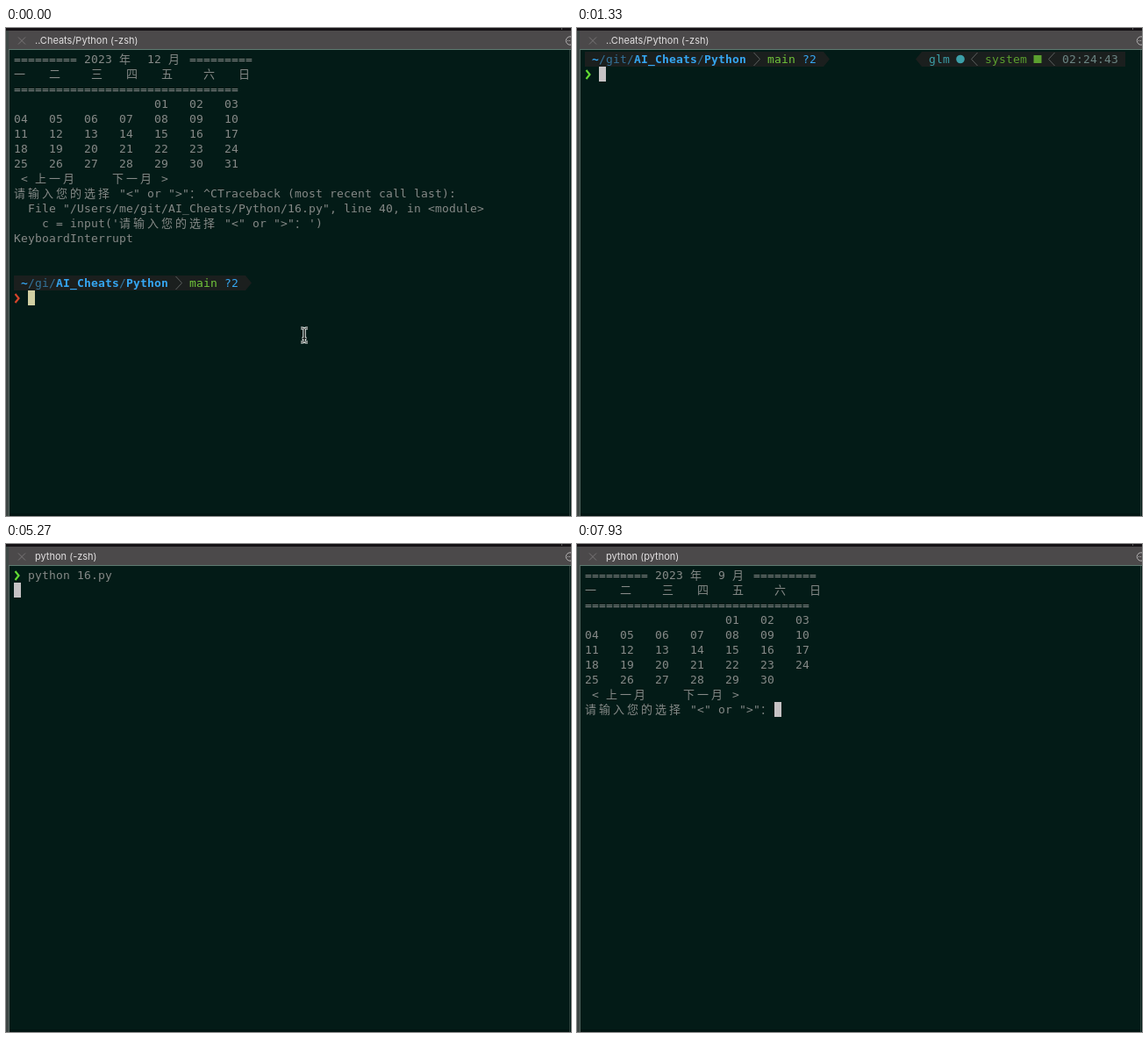
These frames come from a looping animation (644 px wide and 556 px high, 8000 ms). An HTML page with a canvas:

```html
<!DOCTYPE html>
<html lang="zh-CN">
<head>
<meta charset="utf-8">
<title>Terminal calendar</title>
<style>
html, body { margin: 0; width: 100%; height: 100%; overflow: hidden; background: #031b17; }
canvas { display: block; }
</style>
</head>
<body>
<canvas id="stage" width="644" height="556"></canvas>
<script>
const ctx = document.getElementById('stage').getContext('2d');
const LOOP = 8000, CELL = 8, LINE = 17, LEFT = 9, TOP = 27;
const MONO = '13px "DejaVu Sans Mono", "Noto Sans CJK SC", "Noto Sans CJK", monospace';
const C = {
  bg: '#031b17', text: '#858987', seg: '#1b1f1e', sep: '#5c605f',
  blue: '#35a6f2', dimBlue: '#33749c', green: '#72c83b', teal: '#3b9fa8',
  leaf: '#5ba02f', time: '#6b8583', red: '#d5452c', lime: '#62d933',
  cursor: '#c6c2c4', warm: '#d0cfa2'
};
const ASK = '请输入您的选择 "<" or ">"：';
const colX = c => LEFT + c * CELL;
const rowY = r => TOP + r * LINE;

function rect(x, y, w, h, color) {
  ctx.fillStyle = color;
  ctx.fillRect(x, y, w, h);
}

function line(points, color, width) {
  ctx.strokeStyle = color;
  ctx.lineWidth = width;
  ctx.beginPath();
  points.forEach(([x, y], i) => i ? ctx.lineTo(x, y) : ctx.moveTo(x, y));
  ctx.stroke();
}

// Writes on the cell grid; CJK characters take two cells. Returns the next column.
function put(s, col, row, color = C.text, bold = false) {
  ctx.font = (bold ? 'bold ' : '') + MONO;
  ctx.fillStyle = color;
  for (const ch of s) {
    if (ch !== ' ') ctx.fillText(ch, colX(col), rowY(row) + 13);
    col += ch.charCodeAt(0) > 0x2e7f ? 2 : 1;
  }
  return col;
}

function cursor(col, row, color = C.cursor) {
  rect(colX(col), rowY(row), CELL, LINE, color);
}

function frame(title) {
  rect(0, 0, 644, 556, C.bg);
  rect(0, 0, 644, 3, '#151215');
  rect(0, 3, 644, 21, '#4b494a');
  rect(0, 24, 644, 1, '#5d7a70');
  rect(0, 3, 3, 553, '#3e4745');
  rect(3, 25, 1, 531, '#53635e');
  rect(642, 25, 1, 531, '#2b3f3a');
  rect(4, 553, 638, 3, '#021512');
  rect(633, 0, 1, 2, '#555');
  line([[14, 10.5], [22, 18.5]], '#787576', 1);
  line([[22, 10.5], [14, 18.5]], '#787576', 1);
  ctx.strokeStyle = '#b5b3b4';
  ctx.beginPath();
  ctx.arc(643, 14.5, 4.7, 0, 7);
  ctx.stroke();
  rect(640, 14, 1, 1, '#b5b3b4');
  rect(642, 14, 1, 1, '#b5b3b4');
  ctx.font = '11px Inter, "Open Sans", sans-serif';
  ctx.fillStyle = '#e2e0e1';
  ctx.fillText(title, 33, 18);
}

// Pointed status strip between two columns.
function strip(from, to, row, dir) {
  const y = rowY(row), tip = colX(dir > 0 ? to : from);
  rect(colX(from), y, colX(to) - colX(from), LINE, C.seg);
  ctx.beginPath();
  ctx.moveTo(tip, y);
  ctx.lineTo(tip + dir * 7, y + LINE / 2);
  ctx.lineTo(tip, y + LINE);
  ctx.fill();
}

function angle(col, row, dir) {
  const x = colX(col) + 4, y = rowY(row);
  line([[x - dir * 3.5, y + 1], [x + dir * 3.5, y + 8.5], [x - dir * 3.5, y + 16]], C.sep, 1);
}

function chevron(row, color) {
  const y = rowY(row);
  line([[10.5, y + 4], [14.5, y + 9], [10.5, y + 14]], color, 2.2);
}

function prompt(dir, row) {
  const end = 31 + dir.length - 2;
  strip(0, end + 2, row, 1);
  let c = put('~', 1, row, C.blue, true);
  c = put('/' + dir + '/', c, row, C.dimBlue);
  c = put('AI_Cheats', c, row, C.blue, true);
  c = put('/', c, row, C.dimBlue);
  c = put('Python', c, row, C.blue, true);
  angle(c + 1, row, 1);
  c = put('main', c + 3, row, C.green);
  put('?2', c + 1, row, C.blue);
}

function status(row) {
  const y = rowY(row);
  strip(48, 77, row, -1);
  put('glm', 49, row, C.teal);
  ctx.fillStyle = C.teal;
  ctx.beginPath();
  ctx.arc(437, y + 8.5, 4.8, 0, 7);
  ctx.fill();
  angle(55, row, -1);
  put('system', 57, row, C.leaf);
  rect(520.5, y + 4, 9, 9, C.leaf);
  angle(66, row, -1);
  put('02:24:43', 68, row, C.time);
}

function command(text, row, mark, block) {
  chevron(row, mark);
  const c = put(text, 2, row);
  if (block) cursor(c, row, block);
}

function calendar(month) {
  const bar = '='.repeat(9);
  put(`${bar} 2023 年  ${month} 月 ${bar}`, 0, 0);
  put('一   二    三   四   五    六   日', 0, 1);
  put('='.repeat(32), 0, 2);
  const first = (new Date(2023, month - 1, 1).getDay() + 6) % 7;
  const days = new Date(2023, month, 0).getDate();
  for (let d = 1; d <= days; d++) {
    const slot = first + d - 1;
    put(String(d).padStart(2, '0'), slot % 7 * 5, 3 + Math.floor(slot / 7));
  }
  put(' < 上一月     下一月 >', 0, 8);
  put(ASK, 0, 9);
}

function beam(x, y) {
  const shape = [
    [[x - 4, y - 8], [x - 1.5, y - 8], [x, y - 6.5], [x, y + 6.5], [x - 1.5, y + 8], [x - 4, y + 8]],
    [[x + 4, y - 8], [x + 1.5, y - 8], [x, y - 6.5], [x, y + 6.5], [x + 1.5, y + 8], [x + 4, y + 8]],
    [[x - 2.5, y + 3.5], [x + 2.5, y + 3.5]]
  ];
  shape.forEach(p => line(p, '#e8ecea', 3));
  shape.forEach(p => line(p, '#101614', 1));
}

function interrupted(t) {
  calendar(12);
  put('^CTraceback (most recent call last):', 27, 9);
  put('File "/Users/me/git/AI_Cheats/Python/16.py", line 40, in <module>', 2, 10);
  put(`c = input('${ASK}')`, 4, 11);
  put('KeyboardInterrupt', 0, 12);
  if (t < 1200) {
    const typed = [200, 330, 470, 600, 730].filter(k => t >= k).length;
    prompt('gi', 15);
    command('clear'.slice(0, typed), 16, C.red, C.warm);
    if (t < 330) beam(340, 350);
  } else {
    command('clear', 15, C.red);
    cursor(0, 16);
  }
}

function shell(t) {
  const typed = t < 3130 ? '' : t < 4130 ? 'pytho' : 'python 16.py';
  prompt('git', 0);
  status(0);
  command(typed, 1, C.lime, C.cursor);
}

function program(t) {
  if (t < 7470) {
    calendar(8);
    if (t >= 6670) put('>', 27, 9);
    if (t >= 7400) cursor(0, 10);
    else cursor(t < 6670 ? 27 : 28, 9);
  } else if (t >= 7930) {
    calendar(9);
    cursor(27, 9);
  }
}

function titleAt(t) {
  if (t >= 6000) return 'python (python)';
  if (t >= 5270) return 'python (-zsh)';
  return t >= 1200 && t < 1330 ? 'clear (-zsh)' : '..Cheats/Python (-zsh)';
}

function draw() {
  const t = performance.now() % LOOP;
  frame(titleAt(t));
  if (t < 1270) interrupted(t);
  else if (t < 1330) cursor(0, 0);
  else if (t < 5270) shell(t);
  else if (t < 5330) {
    command('python 16.py', 0, C.lime);
    cursor(0, 1);
  } else program(t);
  requestAnimationFrame(draw);
}
draw();
</script>
</body>
</html>
```
